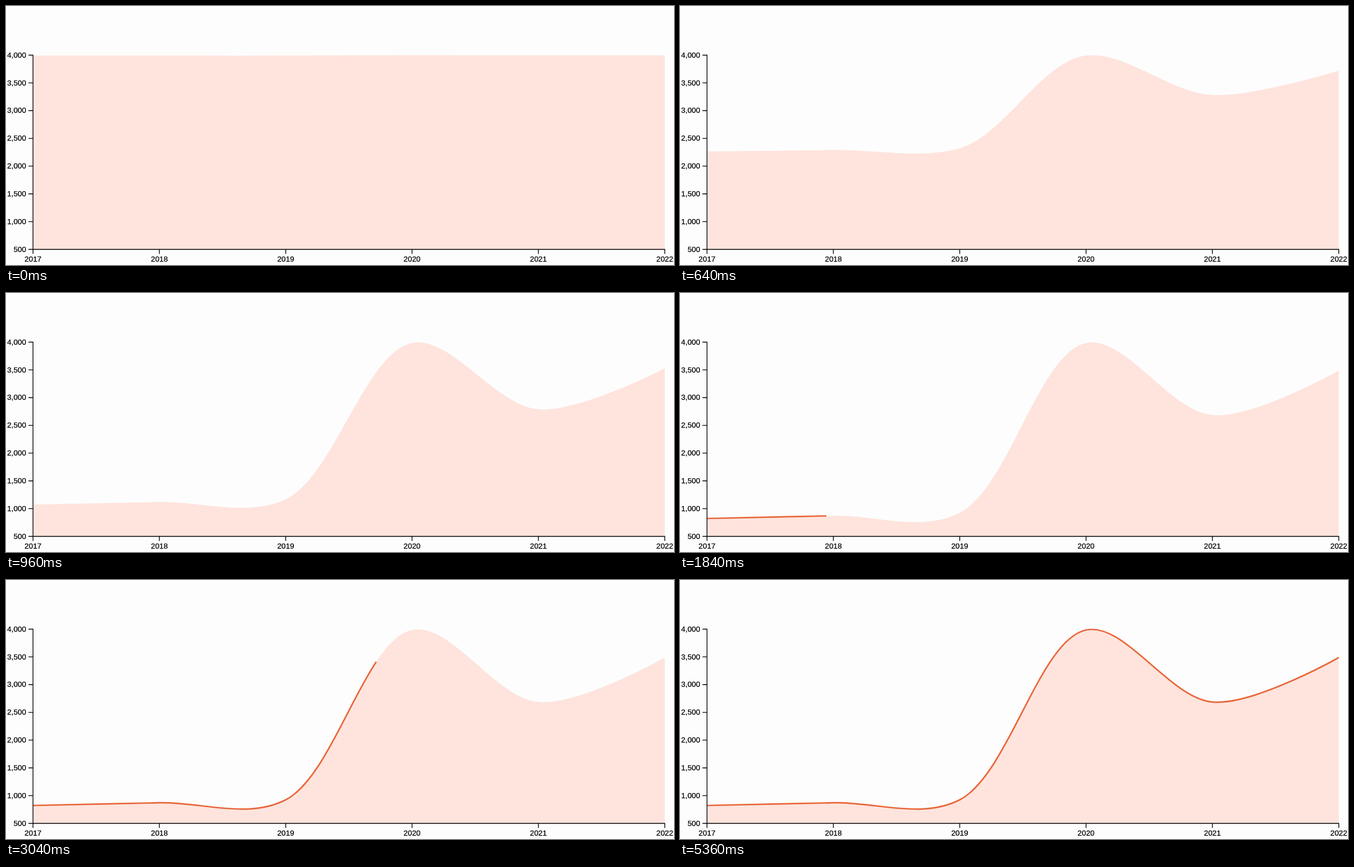
Animation, 1172 px wide and 456 px high, one loop 5.44 s. Source, as an HTML page:

```html
<!DOCTYPE html>
<html lang="en">
<head>
<meta charset="utf-8">
<title>Area chart</title>
<style>
  html, body { margin: 0; width: 100%; height: 100%; overflow: hidden; background: #fdfdfd; }
  svg { display: block; width: 1172px; height: 456px; }
  text { font: 13.33px "Liberation Sans", Arial, sans-serif; stroke: #000; stroke-width: .25px; }
  #area { fill: #fee4dd; }
  #line { fill: none; stroke: #e9673b; stroke-width: 2.7; }
  #axes path { fill: none; stroke: #000; stroke-width: 1.33; }
</style>
</head>
<body>
<svg viewBox="0 0 1172 456">
  <path id="area"/>
  <path id="line"/>
  <g id="axes"></g>
</svg>
<script>
const LOOP = 5440, LEAD = 133, RISE = 1500, DRAW = 3000;
const LEFT = 47.4, RIGHT = 1155.8, TOP = 86.5, BASE = 428.5;
const STEP = (RIGHT - LEFT) / 5;
const heights = [397, 392.2, 387, 88, 214.8, 136.5];

const area = document.getElementById('area');
const line = document.getElementById('line');
const axes = document.getElementById('axes');

// Centripetal Catmull-Rom spline as a flat list of Bezier points
function spline(ys) {
  const pts = ys.map((y, i) => [LEFT + i * STEP, y]);
  const dist = (a, b) => Math.hypot(a[0] - b[0], a[1] - b[1]);
  const control = (near, mid, far) => {
    // handle at mid, on the side of near
    const n2 = dist(near, mid), f2 = dist(mid, far);
    if (!n2 || !f2) return mid;
    const n = Math.sqrt(n2), f = Math.sqrt(f2);
    const a = 2 * f2 + 3 * f * n + n2, m = 3 * f * (f + n);
    return mid.map((v, k) => (v * a + near[k] * f2 - far[k] * n2) / m);
  };
  const out = [pts[0]];
  for (let i = 0; i < 5; i++) {
    const p = pts[i], q = pts[i + 1];
    out.push(control(q, p, pts[i - 1] || p), control(p, q, pts[i + 2] || q), q);
  }
  return out;
}

const toPath = pts => 'M' + pts[0] + 'C' + pts.slice(1).join(' ');
const easeCubic = p => p < .5 ? 4 * p ** 3 : 1 - 4 * (1 - p) ** 3;
const clamp = v => Math.min(1, Math.max(0, v));

const flat = spline(heights.map(() => TOP));
const full = spline(heights);
line.setAttribute('d', toPath(full));
const length = line.getTotalLength();

function drawAxes() {
  let d = `M${LEFT - 8},${TOP}H${LEFT}V${BASE}H${LEFT - 8}` +
          `M${LEFT},${BASE + 8}V${BASE}H${RIGHT}V${BASE + 8}`;
  let labels = '';
  for (let i = 0; i < 8; i++) {
    const y = BASE - (BASE - TOP) * i / 7;
    d += `M${LEFT - 8},${y}H${LEFT}`;
    labels += `<text x="${LEFT - 12}" y="${y + 4.2}" text-anchor="end">${(500 + 500 * i).toLocaleString('en-US')}</text>`;
  }
  for (let i = 0; i < 6; i++) {
    const x = LEFT + i * STEP;
    d += `M${x},${BASE}V${BASE + 8}`;
    labels += `<text x="${x}" y="${BASE + 21.5}" text-anchor="middle">${2017 + i}</text>`;
  }
  axes.innerHTML = `<path d="${d}"/>${labels}`;
}

function frame() {
  const t = performance.now() % LOOP + LEAD;
  const rise = easeCubic(clamp(t / RISE));
  const drawn = clamp((t - RISE) / DRAW) * length;
  const top = flat.map((p, i) => p.map((v, k) => v + (full[i][k] - v) * rise));
  area.setAttribute('d', toPath(top) + `V${BASE}H${LEFT}Z`);
  line.style.visibility = drawn > 0 ? 'visible' : 'hidden';
  line.setAttribute('stroke-dasharray', `${drawn} ${length + 10}`);
  requestAnimationFrame(frame);
}

drawAxes();
frame();
</script>
</body>
</html>
```
